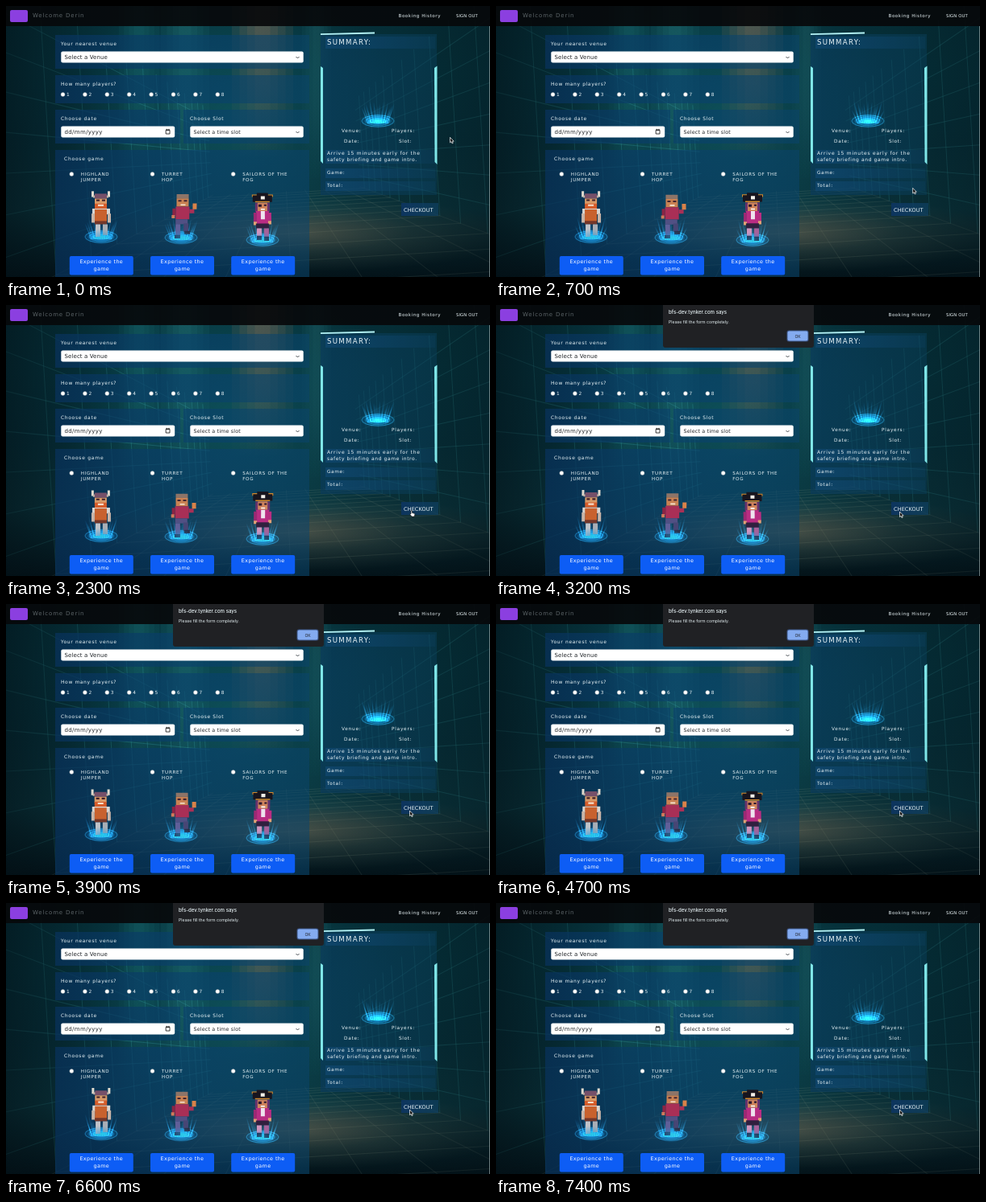
An HTML page with a canvas for the animation above (7500 ms loop, 600 by 337 pixels).

```html
<!DOCTYPE html>
<html lang="en">
<head>
<meta charset="utf-8">
<title>Booking form</title>
<style>
html, body { margin: 0; width: 100%; height: 100%; overflow: hidden; background: #04161c; }
canvas, svg { position: absolute; left: 0; top: 0; width: 600px; height: 337px; }
text { font-family: "DejaVu Sans", Verdana, sans-serif; fill: #e8f3f6; white-space: pre; }
#dialog text { font-family: Inter, Roboto, sans-serif; }
</style>
</head>
<body>
<canvas id="scene" width="600" height="337"></canvas>
<svg id="ui" viewBox="0 0 600 337">
  <g id="form"></g>
  <g id="dialog">
    <path d="M207 0H394V50Q394 53 391 53H210Q207 53 207 50Z" fill="#202124"/>
    <rect x="360.5" y="31.5" width="27" height="14" rx="2.5" fill="#3d5686"/>
    <rect x="361.5" y="32.5" width="25" height="12" rx="2" fill="#84abf0"/>
    <text x="214" y="11.3" font-size="6.1" font-weight="500">bfs-dev.tynker.com says</text>
    <text x="214" y="23.4" font-size="5.2">Please fill the form completely.</text>
    <text x="374" y="40.5" font-size="5" text-anchor="middle" style="fill:#202124">OK</text>
  </g>
  <path id="arrow" d="M0 0V6.6L1.5 5.3L2.5 7.6L3.7 7.1L2.7 4.9H4.7Z" fill="#111" stroke="#fff" stroke-width=".7"/>
  <path id="hand" d="M1 0.4Q1.9 -.3 2.5 .5V3L5.2 3.7Q6 4 5.8 5L5.2 7.6H2L-.4 4.6Q0 3.8 1 4.4Z" fill="#fff" stroke="#111" stroke-width=".6"/>
</svg>
<script>
const LOOP = 7500, DIALOG_AT = 2800, TAU = Math.PI * 2;
const $ = id => document.getElementById(id);
const ctx = $('scene').getContext('2d');
const mix = (a, b, k) => a + (b - a) * k;

// ---- Form: controls and text ----
function add(tag, attrs, label) {
  const el = document.createElementNS('http://www.w3.org/2000/svg', tag);
  for (const key in attrs) el.setAttribute(key, attrs[key]);
  if (label) el.textContent = label;
  $('form').append(el);
}
function text(label, x, y, size = 6, spacing = 0.65, color = '#e8f3f6', anchor = 'start') {
  add('text', { x, y, 'font-size': size, 'letter-spacing': spacing, 'text-anchor': anchor, style: 'fill:' + color }, label);
}
const box = (x, y, width, height, fill, rx = 0) => add('rect', { x, y, width, height, fill, rx });
const shape = (d, fill) => add('path', { d, fill });
function field(x, y, width, label, size, spacing) {
  box(x + 0.3, y + 0.4, width - 0.6, 14.2, '#fff', 2);
  text(label, x + 4.5, y + 9.9, size, spacing, '#212529');
}
const chevron = (x, y) => add('path', { d: `M${x - 2} ${y - 1}l2 2l2 -2`, fill: 'none', stroke: '#343a40', 'stroke-width': 0.9 });
const radio = (cx, cy) => add('circle', { cx, cy, r: 2.5, fill: '#fff', stroke: '#8a9499', 'stroke-width': 0.4 });

box(5, 5, 22, 15, '#8b3fe0', 2);
text('Welcome Derin', 33, 14.4, 7, 0.85, '#5c6468');
text('Booking History', 486.5, 14.3, 5.6, 0.55);
text('SIGN OUT', 558, 14.3, 5.3, 0.1);

text('Your nearest venue', 68, 48.5);
field(68, 56, 301, 'Select a Venue', 7, 0.1);
chevron(361.5, 64);

text('How many players?', 68, 98.5, 6, 0.6);
for (let i = 0; i < 8; i++) {
  radio(70.5 + 27.4 * i, 110);
  text(String(i + 1), 75 + 27.4 * i, 112, 5.8);
}

text('Choose date', 68, 141.5);
field(68, 149, 141.5, 'dd/mm/yyyy', 7, 0.35);
add('path', { d: 'M198.2 154.5V159H203V154.5ZM198 154h5.2M199.3 152.8v1M201.9 152.8v1', fill: 'none', stroke: '#222', 'stroke-width': 0.9 });
text('Choose Slot', 228, 141.5, 6, 0.6);
field(228, 149, 141, 'Select a time slot', 6.4, 0.15);
chevron(361.5, 157);

text('Choose game', 72, 191.7, 6, 0.75);
[['HIGHLAND', 'JUMPER'], ['TURRET', 'HOP'], ['SAILORS OF THE', 'FOG']].forEach((lines, i) => {
  const x = 78.8 + 100.2 * i;
  radio(x + 2.5, 209);
  lines.forEach((line, row) => text(line, x + 14, 211 + 7.2 * row, 5.6, 0.7));
  box(x, 311, 79, 23.5, '#0d5df5', 2);
  text('Experience the', x + 39.5, 320, 6.4, 0.4, '#fff', 'middle');
  text('game', x + 39.5, 329, 6.4, 0.4, '#fff', 'middle');
});

shape('M390 34.2L457 32.6V34.4L390 36Z', '#b5f4f7');
shape('M390 75L393 77V196L390 193Z', '#7fe6e8');
shape('M531 77L534.5 74.5V197L531.5 194Z', '#7fe6e8');
text('SUMMARY:', 398, 48.2, 8.6, 1.3);
text('Venue:', 416, 157.2, 5.8, 0.75);
text('Players:', 478, 157.2, 5.8, 0.75);
text('Date:', 419, 170.2, 5.8, 0.7);
text('Slot:', 487, 170.2, 5.8, 0.6);
text('Arrive 15 minutes early for the', 398, 185.4, 6, 0.75);
text('safety briefing and game intro.', 398, 193, 6, 0.6);
text('Game:', 398, 209, 5.8, 0.6);
text('Total:', 398, 225, 5.8, 0.75);
text('CHECKOUT', 493, 255.5, 6.5, 0.1);

// ---- Background hall ----
function fade(x0, y0, x1, y1, ...stops) {
  const g = ctx.createLinearGradient(x0, y0, x1, y1);
  stops.forEach((c, i) => g.addColorStop(i / (stops.length - 1), c));
  return g;
}
function paint(fill, x, y, w, h) {
  ctx.fillStyle = fill;
  ctx.fillRect(x, y, w, h);
}
function glow(x, y, rx, ry, rgb, alpha) {
  ctx.save();
  ctx.translate(x, y);
  ctx.scale(rx, ry);
  const g = ctx.createRadialGradient(0, 0, 0, 0, 0, 1);
  g.addColorStop(0, `rgba(${rgb},${alpha})`);
  g.addColorStop(1, `rgba(${rgb},0)`);
  paint(g, -1, -1, 2, 2);
  ctx.restore();
}
function line(x0, y0, x1, y1, color, width = 1) {
  ctx.strokeStyle = color;
  ctx.lineWidth = width;
  ctx.beginPath();
  ctx.moveTo(x0, y0);
  ctx.lineTo(x1, y1);
  ctx.stroke();
}
function beam(x, width, bottom, rgb, alpha) {
  for (let k = 1; k <= 4; k++) {
    const w = width * k / 4;
    paint(fade(0, 0, 0, bottom, `rgba(${rgb},${alpha / 4})`, `rgba(${rgb},${alpha / 6})`, `rgba(${rgb},0)`), x - w / 2, 0, w, bottom);
  }
}

// Camera is slightly rolled; WALL, TOP and FLOOR are the hall's sides at depth 1.
const EYE = { x: 345, y: 190 }, ROLL = -0.06, WALL = 640, TOP = -480, FLOOR = 280, FAR = 7;
const rail = (x, y, color) => line(x, y, x / FAR, y / FAR, color);
function hall() {
  paint(fade(0, 0, 0, 337, '#06343d', '#063640', '#07333d', '#0b373f', '#04141a'), 0, 0, 600, 337);
  glow(285, 140, 210, 170, '20,105,115', 0.5);
  ctx.save();
  ctx.translate(EYE.x, EYE.y);
  ctx.rotate(ROLL);
  const teal = 'rgba(60,165,170,.27)';
  for (let i = 1; i < 8; i++) {
    const y = mix(TOP, FLOOR, i / 8);
    rail(-WALL, y, teal);
    rail(WALL, y, teal);
  }
  for (let i = -4; i <= 4; i++) rail(i * 160, FLOOR, 'rgba(150,165,145,.14)');
  for (let z = 1; z < FAR; z += 0.4) {
    const left = -WALL / z, right = WALL / z, top = TOP / z, floor = FLOOR / z;
    line(left, top, left, floor, teal);
    line(right, top, right, floor, teal);
    line(left, floor, right, floor, 'rgba(150,165,145,.16)');
  }
  ctx.restore();
  beam(165, 50, 230, '40,150,150', 0.3);
  beam(222, 60, 240, '60,165,165', 0.3);
  beam(318, 76, 190, '190,130,95', 0.48);
  beam(385, 36, 220, '60,150,155', 0.26);
  glow(370, 284, 270, 46, '120,120,100', 0.4);
  glow(350, 278, 150, 28, '165,120,85', 0.2);
  paint(fade(0, 0, 600, 0, 'rgba(2,14,20,.6)', 'rgba(2,14,20,0)', 'rgba(2,14,20,0)', 'rgba(2,14,20,.15)', 'rgba(2,14,20,.4)'), 0, 0, 600, 337);
}

function panels() {
  const blue = fade(61, 0, 376, 0, 'rgba(8,50,92,.72)', 'rgba(9,64,108,.64)', 'rgba(9,68,108,.55)');
  paint(blue, 61, 36, 315, 42);
  paint(blue, 61, 86, 315, 35);
  paint(blue, 61, 129, 155, 42);
  paint(blue, 220, 129, 156, 42);
  paint(blue, 61, 179, 315, 158);
  paint(fade(390, 0, 534, 0, 'rgba(9,58,92,.66)', 'rgba(10,66,96,.42)'), 390, 35, 144, 200);
  const band = fade(396, 0, 532, 0, 'rgba(18,76,122,.55)', 'rgba(18,76,122,.15)');
  for (const [y, h] of [[38, 15], [179, 17], [202, 12], [218, 12]]) paint(band, 396, y, 136, h);
  paint(fade(490, 0, 536, 0, 'rgba(12,52,98,.9)', 'rgba(15,68,105,.6)'), 490, 245, 46, 16);
  paint('rgba(7,8,10,.91)', 0, 0, 600, 25);
  paint('rgba(175,190,190,.6)', 599, 25, 1, 312);
}

// ---- Holograms and block figures ----
function hologram(x, y, t) {
  ctx.save();
  ctx.globalCompositeOperation = 'lighter';
  glow(x, y, 22, 9, '0,110,180', 0.7);
  glow(x, y, 13, 4, '60,190,230', 0.5);
  for (let r = 1; r < 4; r++) {
    ctx.strokeStyle = `rgba(50,175,225,${0.3 + r * 0.07})`;
    ctx.lineWidth = 0.7;
    ctx.beginPath();
    ctx.ellipse(x, y, 5 + r * 5, 1.5 + r * 1.9, 0, 0, TAU);
    ctx.stroke();
  }
  for (let i = -8; i <= 8; i++) {
    const h = 19 + 6 * Math.sin(i * 2.7 + t * TAU * 3);
    const ray = fade(0, y + 3, 0, y - h, 'rgba(60,185,235,.55)', 'rgba(30,150,220,0)');
    line(x + i * 1.5, y + 3, x + i * 2.5, y - h, ray, 1.2);
  }
  ctx.restore();
}

// Each block: colour, left, top, width, height, relative to the feet.
const horned = [
  ['#e2dcd0', -12, -56, 3, 7], ['#e2dcd0', 8, -56, 3, 7], ['#bdb4a8', -10, -51, 3, 3], ['#bdb4a8', 6, -51, 3, 3],
  ['#765069', -8, -53, 15, 6], ['#d89a68', -8, -47, 15, 7], ['#41202a', -6, -46, 4, 2], ['#41202a', 1, -46, 4, 2],
  ['#d65d2b', -8, -41, 15, 6], ['#f0dfcd', -4, -40, 7, 2],
  ['#d8d5d2', -11, -35, 22, 7], ['#c8612e', -8, -34, 15, 17], ['#c9b5a9', -12, -29, 4, 11], ['#c9b5a9', 8, -29, 4, 11],
  ['#73372b', -8, -20, 15, 4], ['#c0c3c9', -7, -16, 6, 15], ['#a9aeb6', 2, -16, 6, 13]
];
const runner = [
  ['#8d7468', -6, -53, 15, 5], ['#c98253', -6, -48, 15, 10], ['#432531', -4, -46, 4, 2], ['#432531', 3, -46, 4, 2],
  ['#f4e4d2', -1, -41, 6, 1.5], ['#a92f56', -7, -38, 17, 15], ['#8b2544', -11, -36, 4, 9], ['#cf795a', -12, -28, 4, 4],
  ['#a92f56', 10, -35, 6, 5], ['#d98249', 14, -42, 5, 7],
  ['#515084', -7, -23, 15, 6], ['#605f99', -7, -17, 6, 14], ['#474675', 3, -18, 6, 10], ['#29283e', -8, -4, 7, 4], ['#29283e', 4, -9, 7, 4]
];
const captain = [
  ['#d38a2d', -13, -56, 26, 3], ['#18151e', -12, -55, 24, 8], ['#18151e', -7, -58, 14, 5], ['#f3f0ea', -2, -54, 5, 4],
  ['#d38a2d', -9, -48, 18, 1.5], ['#66336e', -9, -46, 18, 11], ['#d0845c', -6, -46, 12, 10], ['#2a1731', -5, -44, 4, 3],
  ['#2a1731', 2, -44, 3, 2], ['#fff', -2, -39, 5, 1.5], ['#b92d83', -8, -36, 16, 16], ['#eee3ee', -2, -36, 5, 10],
  ['#9d2974', -11, -34, 4, 12], ['#b92d83', 7, -34, 4, 11], ['#e0a174', -11, -23, 4, 4], ['#e0a174', 7, -24, 4, 4],
  ['#31203f', -8, -21, 16, 6], ['#d294be', -7, -15, 6, 10], ['#a7609a', 2, -15, 6, 11], ['#241b30', -7, -6, 6, 5], ['#241b30', 2, -5, 6, 5]
];
function figure(blocks, x, y, t, shift) {
  hologram(x, y - 1, t);
  const swing = Math.sin(t * TAU * 5 + shift);
  ctx.save();
  ctx.translate(x, y);
  ctx.transform(1, 0, -0.012 * swing, 1.03 + 0.008 * swing, 0, 0);
  for (const [color, ...rect] of blocks) paint(color, ...rect);
  ctx.restore();
  glow(x, y - 1, 18, 10, '30,150,215', 0.6);
}

// ---- Pointer, dialog and loop ----
function place(el, shown, x, y) {
  el.style.display = shown ? '' : 'none';
  el.setAttribute('transform', `translate(${x} ${y})`);
}
function pointer(ms) {
  const k = Math.min(1, Math.max(0, (ms - 200) / 800));
  const ease = k * k * (3 - 2 * k);
  const x = mix(550.5, 501, ease), y = mix(163.3, 255.5, ease);
  const open = ms >= DIALOG_AT, over = !open && y > 245 && x < 536;
  place($('arrow'), !over, open ? 500.5 : x, open ? 257 : y);
  place($('hand'), over, x, y);
  $('dialog').style.display = open ? '' : 'none';
}
function frame(now) {
  const ms = Math.floor((now % LOOP) / 100) * 100, t = ms / LOOP;
  hall();
  panels();
  hologram(461, 143, t);
  figure(horned, 118, 288, t, 0);
  figure(runner, 217, 289, t, 1.8);
  figure(captain, 318, 292, t, 3.4);
  pointer(ms);
}
const start = performance.now();
function tick() {
  frame(performance.now() - start);
  requestAnimationFrame(tick);
}
tick();
</script>
</body>
</html>
```
